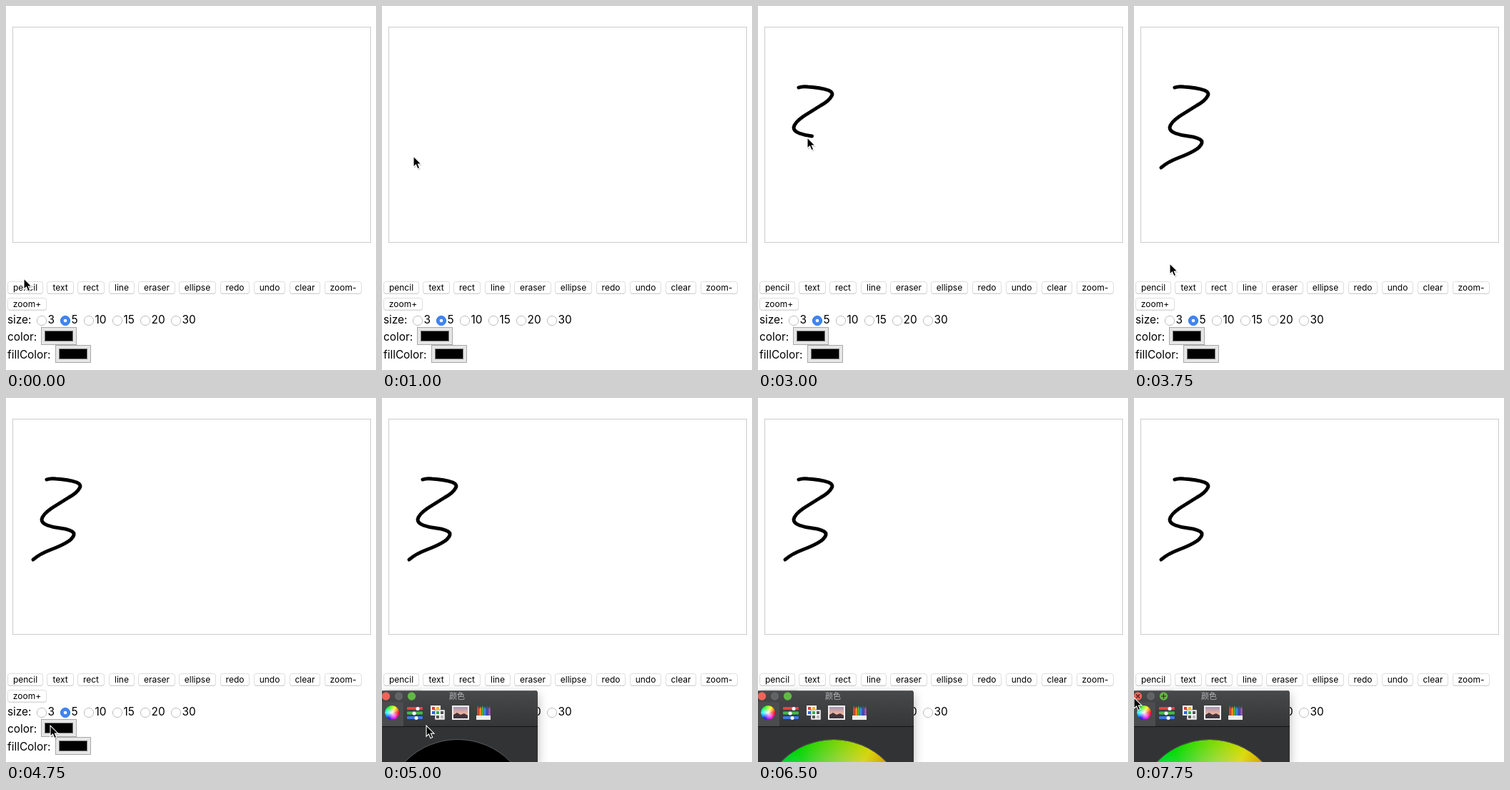
An HTML page that plays this animation: 518 px wide and 509 px high, repeating every 8000 ms.

```html
<!DOCTYPE html>
<html lang="en">
<head>
<meta charset="utf-8">
<title>Drawing board</title>
<style>
  html, body { margin: 0; width: 100%; height: 100%; overflow: hidden; background: #fff; }
  #stage { position: relative; width: 518px; height: 509px; overflow: hidden; }
  #stage > svg { position: absolute; left: 0; top: 0; }
  text { font: 15.4px Inter, sans-serif; }
  .button text { font-size: 12px; text-anchor: middle; }

  .timed { animation: 8s step-end infinite; }
  #stroke { fill: none; stroke: #000; stroke-width: 5; stroke-linecap: round; stroke-linejoin: round;
    stroke-dasharray: 100 200; animation-name: draw; }
  #cursor { animation-name: point; }
  #panel { position: absolute; left: 0; top: 409px; width: 218px; height: 100px; overflow: hidden;
    background: #323335; border-radius: 0 4px 0 0; box-shadow: 0 5px 15px rgba(0,0,0,.28);
    animation-name: open; }
  #panel svg { position: absolute; left: 0; top: 0; }
  #panel text { font: 11px "Noto Sans CJK SC", "Noto Sans CJK", sans-serif; fill: #b8b8ba; }
  #ring { position: absolute; left: 2px; top: 68px; width: 206px; height: 206px;
    border: 1px solid #555657; border-radius: 50%; overflow: hidden; }
  .hues { border-radius: 50%;
    background: radial-gradient(closest-side, #fff, rgba(255,255,255,0)),
      conic-gradient(from 90deg, red, #f0f, #00f, #0ff, #0f0, #ff0, red); }
  #wheel { width: 100%; height: 100%; animation-name: brighten; }
  #tab { position: absolute; left: 4px; top: 21px; width: 20px; height: 20px; }
  #marks { animation-name: hover; }

  @keyframes draw {
    0% { visibility: hidden; stroke-dashoffset: 100; }
    31.25% { visibility: visible; stroke-dashoffset: 96; }
    34.375% { visibility: visible; stroke-dashoffset: 71; }
    37.5% { visibility: visible; stroke-dashoffset: 37.4; }
    40.625% { visibility: visible; stroke-dashoffset: 23; }
    43.75%, 100% { visibility: visible; stroke-dashoffset: 0; }
  }
  @keyframes point {
    0% { transform: translate(25px, 381px); }
    3.125% { transform: translate(25px, 396px); }
    9.375% { transform: translate(30px, 330px); }
    12.5% { transform: translate(44px, 210px); }
    15.625% { transform: translate(53px, 122px); }
    18.75% { transform: translate(24px, 290px); }
    21.875% { transform: translate(10px, 399px); }
    25% { transform: translate(12px, 391px); }
    28.125% { transform: translate(40px, 200px); }
    31.25% { transform: translate(57px, 115px); }
    34.375% { transform: translate(83px, 140px); }
    37.5% { transform: translate(69px, 184px); }
    40.625% { transform: translate(84px, 202px); }
    43.75% { transform: translate(31px, 228px); }
    46.875% { transform: translate(50px, 360px); }
    50% { transform: translate(80px, 484px); }
    53.125% { transform: translate(70px, 472px); }
    56.25% { transform: translate(64px, 462px); }
    59.375% { transform: translate(62px, 458px); }
    65.625% { transform: translate(62px, 480px); }
    68.75% { transform: translate(-40px, 520px); }
    93.75% { transform: translate(2px, 445px); }
    96.875%, 100% { transform: translate(0, 419px); }
  }
  @keyframes open {
    0% { visibility: hidden; }
    62.5%, 100% { visibility: visible; }
  }
  @keyframes brighten {
    0% { filter: brightness(0); }
    81.25% { filter: brightness(.84); }
    84.375%, 100% { filter: brightness(.86); }
  }
  @keyframes hover {
    0% { opacity: 0; }
    96.875%, 100% { opacity: 1; }
  }
</style>
</head>
<body>
<div id="stage">
  <svg width="518" height="509">
    <rect x="9.5" y="29.5" width="501" height="301" fill="#fff" stroke="#ccc"/>
    <path id="stroke" class="timed" pathLength="100" d="M57 114 Q62 112 70 113 Q87 114 99 118 Q106 121 103 126
      Q99 133 88 139 L64 154 Q51 163 50 170 Q50 175 58 178 Q66 181 76 182 Q92 184 95 189 Q96 194 88 200
      Q79 206 63 212 Q47 218 38 226"/>
    <g id="controls"></g>
    <text x="2" y="444">size:</text>
    <text x="2" y="468">color:</text>
    <text x="2" y="493">fillColor:</text>
  </svg>

  <div id="panel" class="timed">
    <div id="ring"><div id="wheel" class="hues timed"></div></div>
    <svg width="218" height="100" viewBox="0 409 218 100">
      <defs>
        <linearGradient id="bar" x2="0" y2="1">
          <stop stop-color="#48494b"/><stop offset="1" stop-color="#353638"/>
        </linearGradient>
        <linearGradient id="dusk" x2="0" y2="1">
          <stop stop-color="#a596b8"/><stop offset=".6" stop-color="#f0b39b"/><stop offset="1" stop-color="#8b5b60"/>
        </linearGradient>
      </defs>
      <rect y="409" width="218" height="50" fill="url(#bar)"/>
      <path d="M0 409.5H215" stroke="#68696b"/>
      <path d="M0 425H27Q30 425 30 428V459H0Z" fill="#4b4c4e"/>
      <path d="M0 459.5H218" stroke="#131415"/>
      <circle cx="5.5" cy="417" r="5.7" fill="#ed6558"/>
      <circle cx="23.5" cy="417" r="5.7" fill="#626365"/>
      <circle cx="41.5" cy="417" r="5.7" fill="#61b944"/>
      <path id="marks" class="timed" d="M3 414.5l5 5m0-5l-5 5M38 417h7m-3.5-3.5v7" stroke="#3a1f18" stroke-width="1.2"/>
      <text x="94" y="421">颜色</text>
      <g id="icons"></g>
      <g>
        <path d="M68 430h14v14h-14z" fill="#f4f4f4"/>
        <path d="M74 436h14v14h-14z" fill="#f4f4f4" stroke="#555" stroke-width=".6"/>
        <path d="M70 432h4v4h-4z" fill="#e33"/><path d="M76 432h4v4h-4z" fill="#f5b91d"/>
        <path d="M70 438h4v4h-4z" fill="#2867e0"/><path d="M76 438h4v4h-4z" fill="#35ad42"/>
        <path d="M82 438h4v4h-4zM76 444h4v4h-4z" fill="#555"/><path d="M82 444h4v4h-4z" fill="#bbb"/>
      </g>
      <g>
        <path d="M98 430h24v20H98z" fill="#eee"/>
        <path d="M100 432h20v16h-20z" fill="url(#dusk)"/>
        <path d="M100 448v-5l5-3 5 3 5-2 5 3v4z" fill="#42343c"/>
      </g>
    </svg>
    <div id="tab" class="hues"></div>
  </div>

  <svg width="518" height="509">
    <g id="cursor" class="timed">
      <path d="M1 2V17L4.5 14 7 19.5 10 18 7.5 13H12Z" fill="#000" opacity=".18"/>
      <path d="M0 0V15.2L3.5 12 6 17.7 8.7 16.5 6.3 11.1H11Z" fill="#000" stroke="#fff" stroke-width="1.1"/>
    </g>
  </svg>
</div>
<script>
  const rect = (x, y, w, h, attrs) => `<rect x="${x}" y="${y}" width="${w}" height="${h}" ${attrs}/>`;

  const button = (label, x, w, y = 385) => `<g class="button">
    ${rect(x + .5, y + 1, w - 1, 16.8, 'rx="3" fill="#bbb"')}
    ${rect(x + .5, y + .5, w - 1, 16.5, 'rx="3" fill="#fff" stroke="#dedede"')}
    <text x="${x + w / 2}" y="${y + 13}">${label}</text></g>`;

  const radio = (size, x) => {
    const on = size === 5;
    return `<circle cx="${x}" cy="440" r="6.6" fill="${on ? '#3f85f5' : '#fff'}" stroke="${on ? '#3478ea' : '#bdbdbd'}"/>
      ${on ? `<circle cx="${x}" cy="440" r="2.3" fill="#fff"/>` : ''}
      <text x="${x + 8.5}" y="444">${size}</text>`;
  };

  const swatch = (x, y) =>
    rect(x + .5, y + .5, 49, 24, 'fill="#e6e6e6" stroke="#a9a9a9"') +
    rect(x + 5.5, y + 5.5, 39, 14, 'fill="#000" stroke="#777"');

  const buttons = [['pencil', 2, 50], ['text', 57, 38], ['rect', 100, 38], ['line', 144, 36],
    ['eraser', 185, 52], ['ellipse', 242, 52], ['redo', 300, 41], ['undo', 347, 44],
    ['clear', 397, 43], ['zoom-', 446, 52], ['zoom+', 2, 55, 408]];
  const radios = [[3, 50], [5, 83], [10, 116], [15, 156], [20, 195], [30, 238]];

  document.getElementById('controls').innerHTML =
    buttons.map(b => button(...b)).join('') +
    radios.map(r => radio(...r)).join('') +
    swatch(49, 449) + swatch(69, 474);

  const slider = ([color, knob], i) => {
    const y = 432 + i * 6.5;
    return rect(35, y, 22, 4, `rx="1" fill="${color}"`) +
      `<circle cx="${knob}" cy="${y + 2.4}" r="2.5" fill="#fff"/>`;
  };
  const pencil = (color, i) => {
    const x = 133 + i * 3.2, y = 431 + i % 2;
    return `<path d="M${x} 446V${y + 3}l1.4-4 1.4 4V446Z" fill="${color}"/>`;
  };
  document.getElementById('icons').innerHTML =
    [['#e8423f', 50], ['#46b84a', 45], ['#3c78e8', 48]].map(slider).join('') +
    ['#d9433b', '#ef8a2c', '#4fae46', '#3a8fdc', '#3552c4', '#a154b8'].map(pencil).join('') +
    rect(132, 444, 20, 6, 'fill="#eee"');
</script>
</body>
</html>
```
